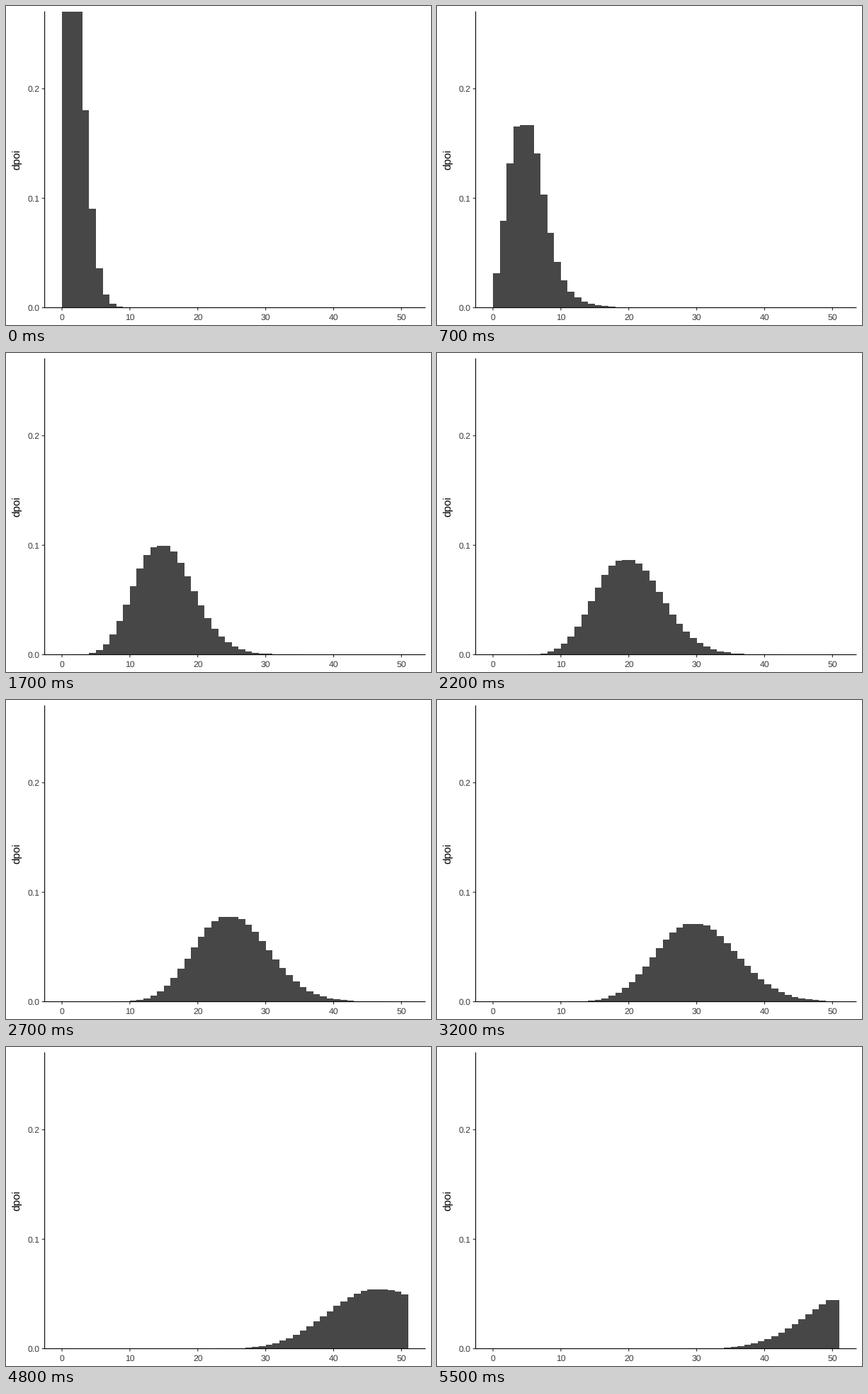
A matplotlib script that plays this animation: 600 by 450 pixels, repeating every 5.6 s.

```python
import math

import matplotlib.pyplot as plt
from matplotlib.animation import FuncAnimation
from matplotlib.patches import Rectangle

WIDTH, HEIGHT, DPI = 600, 450, 100
LEFT, RIGHT, TOP, BOTTOM = 54.6, 592.36, 7.64, 425.6
X_MIN, X_MAX = -2.55, 53.55
LAST_K = 50
RATES = [2] + list(range(5, 56, 5))
HOLD, MOVE = 2, 4  # opening hold and moving frames per transition
PERIOD = 5
FRAMES = 56

BAR, TICK, LABEL = "#474747", "#272727", "#3c3c3c"
LINE_WIDTH = 0.8

plt.rcParams["font.family"] = "Liberation Sans"
plt.rcParams["text.hinting"] = "none"


def poisson(k, rate):
    return math.exp(k * math.log(rate) - rate - math.lgamma(k + 1))


Y_MAX = poisson(2, 2)


def to_x(value):
    return LEFT + (value - X_MIN) / (X_MAX - X_MIN) * (RIGHT - LEFT)


def to_y(value):
    return BOTTOM - value / Y_MAX * (BOTTOM - TOP)


def cubic_in_out(t):
    return 4 * t**3 if t < 0.5 else 1 - 4 * (1 - t) ** 3


fig = plt.figure(figsize=(WIDTH / DPI, HEIGHT / DPI), dpi=DPI, facecolor="white")
ax = fig.add_axes([0, 0, 1, 1])
ax.set_xlim(0, WIDTH)
ax.set_ylim(HEIGHT, 0)
ax.axis("off")


def line(xs, ys, color):
    ax.plot(xs, ys, color=color, lw=LINE_WIDTH, solid_capstyle="butt",
            snap=False, zorder=3)


def draw_axes():
    for value in range(0, 51, 10):
        x = to_x(value)
        line([x, x], [BOTTOM, BOTTOM + 3.82], TICK)
        ax.text(x, 443, str(value), size=8.8, color=LABEL,
                ha="center", va="baseline")
    for value in (0, 0.1, 0.2):
        y = to_y(value)
        line([LEFT - 3.82, LEFT], [y, y], TICK)
        ax.text(47.7, y + 4.4, f"{value:.1f}", size=8.8, color=LABEL,
                ha="right", va="baseline")
    line([LEFT, LEFT], [BOTTOM + 0.5, TOP], "black")
    line([LEFT, RIGHT], [BOTTOM, BOTTOM], "black")
    ax.text(19, (TOP + BOTTOM) / 2, "dpoi", size=11, color="black", rotation=90,
            rotation_mode="anchor", ha="center", va="baseline")


def make_bar(k):
    # Each bar is two units wide, so neighbours overlap.
    x0, x1 = round(to_x(k - 1)), round(to_x(k + 1))
    bar = Rectangle((x0, round(BOTTOM)), x1 - x0, 0, facecolor=BAR,
                    linewidth=0, antialiased=False, zorder=2)
    return ax.add_patch(bar)


draw_axes()
bars = [make_bar(k) for k in range(1, LAST_K + 1)]


def update(frame):
    if frame < HOLD:
        index, mix = 0, 0.0
    else:
        index, step = divmod(frame - HOLD, PERIOD)
        mix = cubic_in_out(min((step + 1) / MOVE, 1))
    start, end = RATES[index], RATES[index + 1]
    for k, bar in enumerate(bars, 1):
        height = (1 - mix) * poisson(k, start) + mix * poisson(k, end)
        bar.set_height(round(to_y(height)) - round(BOTTOM))
    return bars


anim = FuncAnimation(fig, update, frames=FRAMES, interval=100,
                     repeat=True, repeat_delay=0, blit=False)
plt.show()
```
